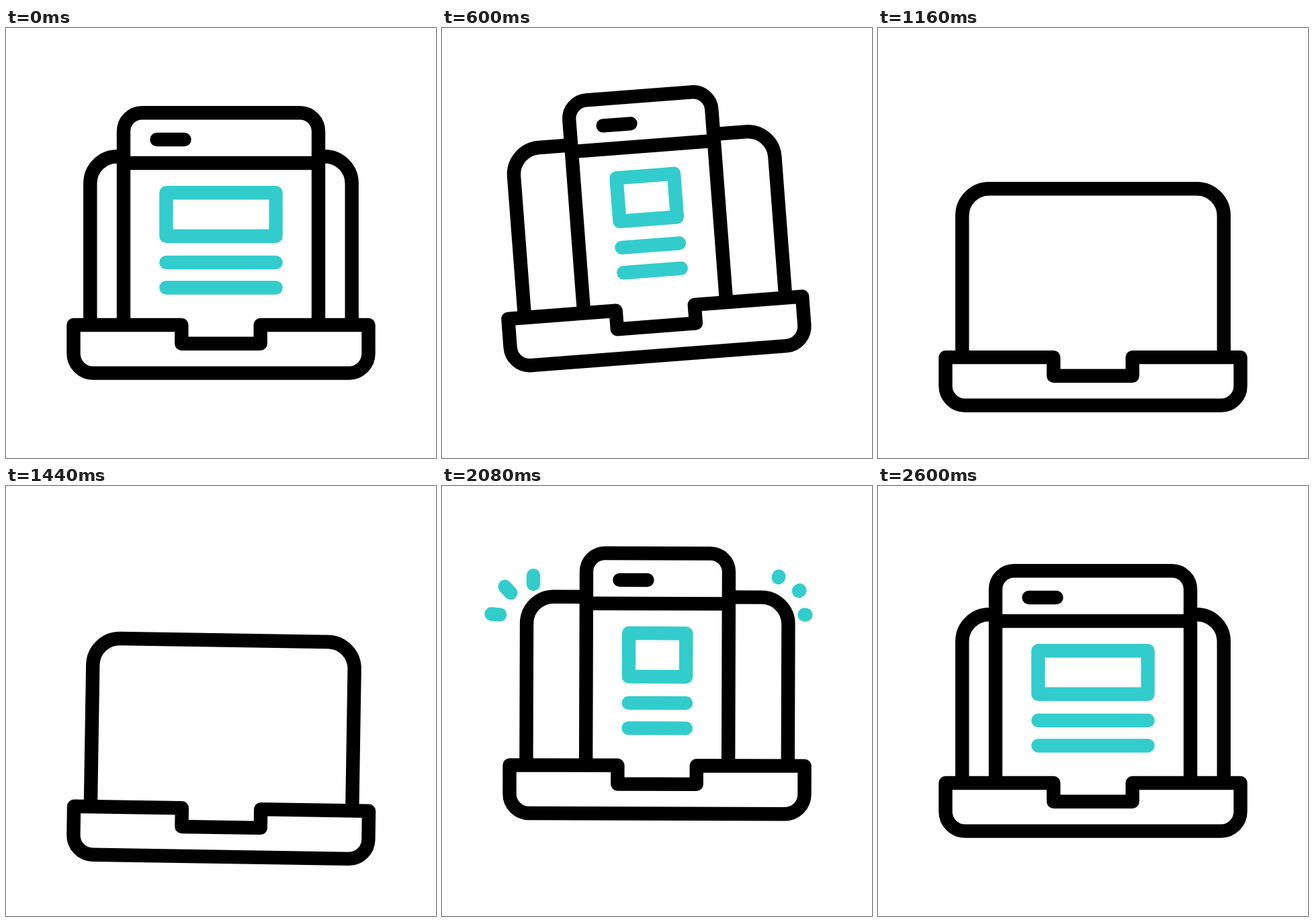
Recreate the animation shown at these times as an HTML page with a canvas. Size 640 px wide and 640 px high, loop 3 s.

```html
<!DOCTYPE html>
<html lang="en">
<head>
<meta charset="utf-8">
<title>Laptop and page</title>
<style>
  html, body { margin: 0; width: 100%; height: 100%; overflow: hidden; background: #fff; }
  canvas { display: block; width: 640px; height: 640px; }
</style>
</head>
<body>
<canvas id="stage" width="640" height="640"></canvas>
<script>
const ctx = document.getElementById('stage').getContext('2d');
const LOOP = 3000, STEP = 40;
const BLACK = '#000', TEAL = '#33cccc', WHITE = '#fff';
const CENTER = 320, PIVOT_Y = 478, DEG = Math.PI / 180;

const progress = (t, from, to) => Math.min(1, Math.max(0, (t - from) / (to - from)));

function ease(t, from, to) {
  const p = progress(t, from, to);
  return p * p * (3 - 2 * p);
}

// The laptop hops up, drops, settles, crouches, hops again and comes to rest.
function pose(t) {
  const hop = ease(t, 220, 620), drop = ease(t, 650, 1050), settle = ease(t, 1050, 1380);
  const crouch = ease(t, 1380, 1640), leap = ease(t, 1640, 2080), rest = ease(t, 2100, 2600);
  return {
    lift: -26 * hop + 78 * drop - 15 * settle + 9 * crouch - 72 * leap + 26 * rest,
    tilt: -4.4 * (hop - ease(t, 650, 950)) + 2.75 * (ease(t, 1200, 1820) - ease(t, 1860, 2120)),
    sink: 355 * (ease(t, 650, 950) - ease(t, 1740, 2040)),
    width: 290 - 78 * (hop - rest)
  };
}

function line(x0, y0, x1, y1, color) {
  ctx.strokeStyle = color;
  ctx.beginPath();
  ctx.moveTo(x0, y0);
  ctx.lineTo(x1, y1);
  ctx.stroke();
}

function paint() {
  ctx.fillStyle = WHITE;
  ctx.fill();
  ctx.strokeStyle = BLACK;
  ctx.stroke();
}

// An open-bottomed panel with two round upper corners.
function panel(width, top, bottom, radius) {
  const left = CENTER - width / 2, right = CENTER + width / 2;
  ctx.beginPath();
  ctx.moveTo(left, bottom);
  ctx.arcTo(left, top, right, top, radius);
  ctx.arcTo(right, top, right, bottom, radius);
  ctx.lineTo(right, bottom);
  paint();
}

function drawPage(width, sink) {
  const left = CENTER - width / 2, inset = left + 63.4, inner = width - 2 * 63.4;
  ctx.save();
  ctx.beginPath();
  ctx.rect(0, -100, 640, 570);
  ctx.clip();
  ctx.translate(0, sink);
  panel(width, 126.2, 500, 27.5);
  line(left, 201, left + width, 201, BLACK);
  line(left + 49.5, 166, left + 90.5, 166, BLACK);
  ctx.strokeStyle = TEAL;
  ctx.strokeRect(inset, 245.2, inner, 64.6);
  for (let row = 0; row < 2; row++) {
    const y = 349 + 37.5 * row;
    line(inset, y, inset + inner, y, TEAL);
  }
  ctx.restore();
}

function drawBase() {
  const half = 219.5, notch = 58.7, top = 442, floor = 469.7, bottom = 513.6, radius = 29;
  ctx.beginPath();
  ctx.moveTo(CENTER - half, top);
  ctx.lineTo(CENTER - notch, top);
  ctx.lineTo(CENTER - notch, floor);
  ctx.lineTo(CENTER + notch, floor);
  ctx.lineTo(CENTER + notch, top);
  ctx.lineTo(CENTER + half, top);
  ctx.arcTo(CENTER + half, bottom, CENTER, bottom, radius);
  ctx.arcTo(CENTER - half, bottom, CENTER - half, top, radius);
  ctx.closePath();
  paint();
}

// Three rays fly outwards from a common point, a fixed angle apart.
function drawRays(x, y, firstAngle, t) {
  const reach = p => 50 + 70 * p;
  const head = ease(t, 1955, 2415);
  const tail = progress(t, 2100, 2440) ** 2.5;
  if (head <= 0 || tail >= 1) return;
  for (let i = 0; i < 3; i++) {
    const angle = (firstAngle + 42.5 * i) * DEG;
    const dx = Math.cos(angle), dy = -Math.sin(angle);
    const near = reach(tail), far = reach(head);
    line(x + dx * near, y + dy * near, x + dx * far, y + dy * far, TEAL);
  }
}

function draw(t) {
  const { lift, tilt, sink, width } = pose(t);
  ctx.fillStyle = WHITE;
  ctx.fillRect(0, 0, 640, 640);
  ctx.lineWidth = 20.4;
  ctx.lineCap = ctx.lineJoin = 'round';

  ctx.save();
  ctx.translate(CENTER, PIVOT_Y + lift);
  ctx.rotate(tilt * DEG);
  ctx.translate(-CENTER, -PIVOT_Y);
  panel(389.4, 191.2, 442, 40);
  drawPage(width, sink);
  drawBase();
  ctx.restore();

  drawRays(136, 196, 90, t);
  drawRays(490, 185, -7.5, t - 80);
}

const start = performance.now();
function tick() {
  const t = (performance.now() - start) % LOOP;
  draw(Math.floor(t / STEP) * STEP);
  requestAnimationFrame(tick);
}
tick();
</script>
</body>
</html>
```
